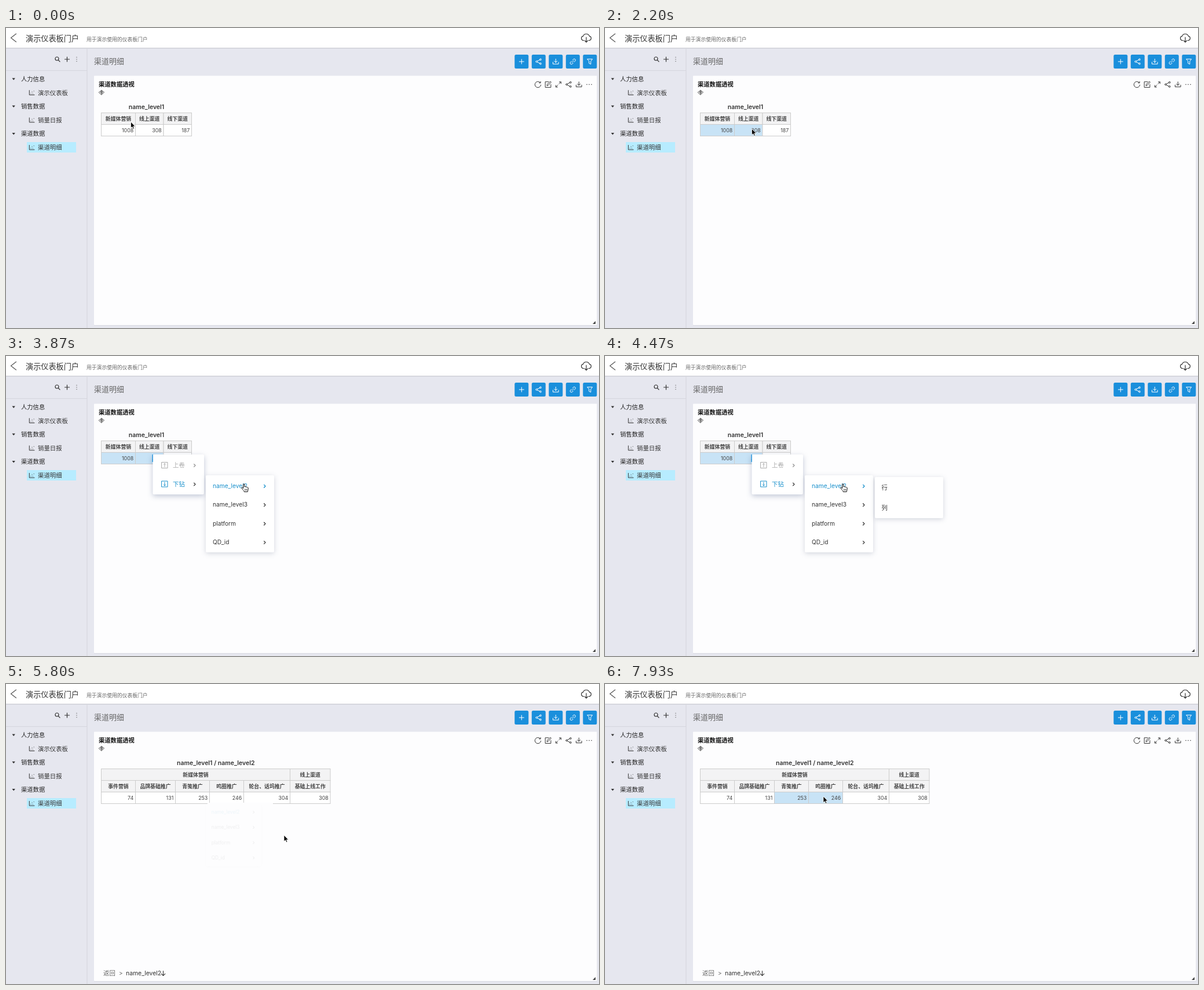
Recreate the animation shown at these times as an HTML page. Size 1024x518 px, loop 8000 ms.

```html
<!DOCTYPE html>
<html lang="zh-CN">
<head>
<meta charset="utf-8">
<title>演示仪表板门户</title>
<style>
  html, body { margin: 0; width: 100%; height: 100%; overflow: hidden; background: #e6e7ef; }
  svg { display: block; width: 100vw; height: 100vh; }
  text { font-family: Inter, "Noto Sans CJK SC", "Noto Sans CJK", sans-serif; }
  .icon { fill: none; stroke-linecap: round; stroke-linejoin: round; }
  .panel { filter: drop-shadow(0 2px 4px rgba(40, 55, 90, .2)); }
  #context { filter: drop-shadow(0 3px 5px rgba(40, 60, 110, .28)); }
</style>
</head>
<body>
<svg id="stage" viewBox="0 0 1024 518" xmlns="http://www.w3.org/2000/svg"></svg>
<script>
const BLUE = '#1a8fdc', LINK = '#178fcb', DARK = '#333', GREY = '#666', LINE = '#ccc', SELECTED = '#c8e3f6';

// ---------- drawing helpers ----------
const rect = (x, y, w, h, fill, extra = '') =>
  `<rect x="${x}" y="${y}" width="${w}" height="${h}" fill="${fill}" ${extra}/>`;
const text = (x, centerY, size, label, fill = DARK, extra = '') =>
  `<text x="${x}" y="${centerY + size * .37}" font-size="${size}" fill="${fill}" ${extra}>${label}</text>`;
const icon = (x, y, d, color = DARK, width = 1, extra = '') =>
  `<path class="icon" transform="translate(${x} ${y})" d="${d}" stroke="${color}" stroke-width="${width}" ${extra}/>`;
const group = (id, body, extra = '') => `<g id="${id}" ${extra}>${body}</g>`;
const MIDDLE = 'text-anchor="middle"', END = 'text-anchor="end"', BOLD = 'font-weight="600"';

const SHAPES = {
  plus: 'M-4 0H4M0-4V4',
  share: 'M-2.2-1L2-3M-2.2 1L2 3M-4.8 0a1.4 1.4 0 1 0 2.8 0a1.4 1.4 0 1 0-2.8 0M1.8-3.6a1.4 1.4 0 1 0 2.8 0a1.4 1.4 0 1 0-2.8 0M1.8 3.6a1.4 1.4 0 1 0 2.8 0a1.4 1.4 0 1 0-2.8 0',
  download: 'M0-4.5V1.5M-2.5-1L0 1.5 2.5-1M-4.8 1V4.2H4.8V1',
  link: 'M-1.5 1.5L1.5-1.5M-.5-2.5L1-4a2.1 2.1 0 0 1 3 3L2.5.5M.5 2.5L-1 4a2.1 2.1 0 0 1-3-3L-2.5-.5',
  filter: 'M-4.3-4.3H4.3L1.5-.5V4.5L-1.5 3V-.5Z',
  reload: 'M4.2-3A5.2 5.2 0 1 0 5.2 .8M4.6-5V-2.6H2.2',
  edit: 'M1-4.7H-5V5H4.7V0M-2 2L-1.5-.3 4-5.3 5.3-4 0 1.4Z',
  expand: 'M1-1L4.3-4.3M1.5-4.5H4.5V-1.5M-1 1L-4.3 4.3M-1.5 4.5H-4.5V1.5',
  chart: 'M-4.2-4V3.8H4.5M-1.5 1.2V1.3M.5-1.6V-1.5M1.7 1.2V1.3M3.7-2.8V-2.7',
  chevron: 'M-1.4-2.4L1 0-1.4 2.4',
};

const panel = (x, y, w, h) => rect(x, y, w, h, '#fff', 'rx="2"');

function menuIcon(y, color, up) {
  const arrow = up ? 'M0 3V-3M-1.5-1.5L0-3 1.5-1.5' : 'M0-3V3M-1.5 1.5L0 3 1.5 1.5';
  return icon(274, y, 'M-5-5H5V5H-5Z' + arrow, color);
}

// ---------- page chrome ----------
function chrome() {
  const sections = [['人力信息', '演示仪表板'], ['销售数据', '销量日报'], ['渠道数据', '渠道明细']];
  const buttons = ['plus', 'share', 'download', 'link', 'filter'];
  return rect(0, 0, 1024, 518, '#e6e7ef')
    + rect(0, 0, 1024, 34, '#fff') + rect(0, 34, 1024, 1.5, '#d0d1d8')
    + rect(139.5, 36, 1, 482, '#d3d4dc') + rect(0, 73, 140, 1, '#d5d6de')
    + icon(13, 17, 'M4.5-7L-4.5 0 4.5 7', '#555', 1.2)
    + text(34, 18, 13.15, '演示仪表板门户')
    + text(139, 20, 8.8, '用于演示使用的仪表板门户', GREY)
    + icon(1002, 17, 'M-4 4.5H-5a3.7 3.7 0 0 1-.5-7.3A5.8 5.8 0 0 1 5.5-2.8A3.7 3.7 0 0 1 5 4.5H4M0-1V7.5M-2.4 5L0 7.5 2.4 5', DARK, 1.2)
    + icon(89, 54, 'M-4-1a3 3 0 1 0 6 0a3 3 0 1 0-6 0M1.3 1.3L4 4', DARK, 1.2)
    + icon(105.5, 54, SHAPES.plus, DARK, 1.2)
    + icon(122, 54, 'M0-3.5V-3.4M0 0V.1M0 3.5V3.6', GREY, 1.4)
    + rect(36, 197, 85, 18, '#b7ecff')
    + sections.map(([title, page], i) => {
        const y = 88 + i * 47.3;
        return `<path d="M10.5 ${y - 1.5}h5.4l-2.7 3.4z" fill="${DARK}"/>`
          + text(26, y, 10.3, title, '#222') + icon(44.5, y + 23.7, SHAPES.chart) + text(55, y + 23.7, 10.4, page);
      }).join('')
    + text(152, 57.5, 13, '渠道明细', GREY)
    + buttons.map((name, i) => {
        const x = 890.3 + i * 29.5;
        return rect(x - 12, 46, 24, 24, BLUE, 'rx="2.5"') + icon(x, 58, SHAPES[name], '#fff');
      }).join('')
    + rect(152, 83, 869, 431, '#d9dae2', 'rx="1"') + rect(152, 82.5, 868.5, 430.5, '#fdfdfe', 'rx="1"')
    + text(160, 97.5, 10.3, '渠道数据透视', '#111', BOLD)
    + icon(165, 111, 'M-4.5 0L0-3.5 4.5 0 0 4ZM0-3.5V4M-1.6 0a1.6 1.6 0 1 0 3.2 0a1.6 1.6 0 1 0-3.2 0', '#444', .9)
    + '<path d="M1018 506V511H1013Z" fill="#444"/>';
}

function toolbar() {
  return ['reload', 'edit', 'expand', 'share', 'download']
    .map((name, i) => icon(918.5 + i * 17.7, 97.5, SHAPES[name])).join('')
    + icon(1007, 97.5, 'M-4 0h.1M0 0h.1M4 0h.1', DARK, 1.4);
}

// ---------- pivot tables ----------
// Each header row lists [label, first column, column after the last].
function pivot(id, title, edges, headerRows, values, selectable) {
  const left = edges[0], right = edges[edges.length - 1], top = 146.5;
  const cell = (x1, x2, y, fill, extra = '') =>
    rect(x1, y, x2 - x1, 20, fill, `stroke="${LINE}" ${extra}`);
  const bodyY = top + headerRows.length * 20;
  const headers = headerRows.map((row, r) => row.map(([label, from, to]) =>
    cell(edges[from], edges[to], top + r * 20, '#f3f3f4')
    + text((edges[from] + edges[to]) / 2, top + r * 20 + 10, 8.9, label, '#444', BOLD + MIDDLE)).join('')).join('');
  const body = values.map((value, i) => cell(edges[i], edges[i + 1], bodyY, '#fff')
    + (selectable.includes(i)
      ? rect(edges[i] + .5, bodyY + .5, edges[i + 1] - edges[i] - 1, 19, SELECTED, `id="${id}${i}"`) : '')
    + text(edges[i + 1] - 3.2, bodyY + 10, 8.9, value, '#444', END)).join('');
  return group(id, text((left + right) / 2, 136, 10.5, title, DARK, BOLD + MIDDLE) + headers + body);
}

const singles = labels => labels.map((label, i) => [label, i, i + 1]);
const summary = pivot('summary', 'name_level1', [164.5, 223.5, 272, 320.5],
  [singles(['新媒体营销', '线上渠道', '线下渠道'])], [1008, 308, 187], [0, 1]);
const detail = pivot('detail', 'name_level1 / name_level2', [164.5, 223.5, 292.5, 351.5, 410.5, 490.5, 560],
  [[['新媒体营销', 0, 5], ['线上渠道', 5, 6]],
   singles(['事件营销', '品牌基础推广', '青笺推广', '鸣圈推广', '轮台、话坞推广', '基础上线工作'])],
  [74, 131, 253, 246, 304, 308], [2, 3]);

const breadcrumb = group('breadcrumb',
  text(168, 499.5, 10.4, '返回', GREY) + text(195, 499.5, 10, '&gt;', GREY)
  + text(207, 499.5, 10.4, 'name_level2') + icon(271.5, 499.5, 'M0-4V4M-3.3 .8L0 4 3.3 .8', DARK, 1.1));

// ---------- menus ----------
const contextMenu = group('context', panel(253.5, 170, 88.5, 69)
  + rect(252.5, 170, 1.3, 13, BLUE)
  + menuIcon(188.5, '#aaa', true) + text(288, 188.5, 10.4, '上卷', '#aaa') + icon(326, 189, SHAPES.chevron, '#888', 1.2)
  + group('drill', menuIcon(221, LINK, false) + text(288, 221.5, 10.4, '下钻', LINK))
  + icon(326, 221.5, SHAPES.chevron, DARK, 1.3, 'id="drillArrow"'));

const levelMenu = group('levels', rect(345, 206, 118, 133, '#fff', 'rx="2"')
  + ['name_level2', 'name_level3', 'platform', 'QD_id'].map((label, i) =>
      text(357, 224.3 + i * 32.4, 10.2, label, DARK, `id="level${i}"`)
      + icon(447, 224.8 + i * 32.4, SHAPES.chevron, DARK, 1.3, `id="levelArrow${i}"`)).join(''), 'class="panel"');

const axisMenu = group('axes', panel(466, 209, 118, 71)
  + text(477.5, 227, 10.4, '行', DARK, 'id="axisRow"') + text(477.5, 262, 10.4, '列', DARK, 'id="axisColumn"'), 'class="panel"');

const pointer = group('pointer',
  `<path id="arrow" d="M0 0V10.8L2.5 8.6 4.1 12.3 5.9 11.5 4.3 7.9H7.6Z" fill="#000" stroke="#fff" stroke-width=".8"/>
   <g id="hand" stroke="#111" stroke-linejoin="round">
     <path d="M-1.2 1a1.1 1.1 0 0 1 2.2 0V5C1.5 4.3 3 4.4 3.2 5.3 4 4.6 5.2 5 5.3 5.9 6.2 5.4 7.2 6 7.2 7V9.5C7.2 11 6.2 11.8 6.2 13.5H.2C.2 12-1 11-2 9.8L-4 7.2C-4.5 6-3 5.4-2.2 6.4L-1.2 7.5Z" fill="#fff"/>
     <path d="M1.6 8.5V11.5M3.4 8.5V11.5M5.1 8.5V11.5" stroke-width=".7"/>
   </g>`);

document.getElementById('stage').innerHTML = chrome() + group('toolbar', toolbar()) + summary + detail
  + breadcrumb + rect(348, 205, 113, 3, '#fdfdfe', 'id="residue"') + contextMenu + levelMenu + axisMenu + pointer;

// ---------- timeline ----------
const LOOP = 8000, STEP = 200 / 3;
const RIGHT_CLICK = 2390, LEVELS_OPEN = 3087, AXES_OPEN = 4190, DRILLED = 5666;
const PATH = [
  [66, 215.5, 162], [267, 207, 176], [533, 207, 176], [800, 235.5, 174.5], [1333, 253.5, 174],
  [2533, 253.5, 174], [3000, 305, 217], [3267, 305, 217], [3867, 411, 221], [4533, 411, 221],
  [4933, 480, 232], [5333, 480, 261], [5867, 480, 261], [6667, 335, 195], [7133, 335, 195], [7600, 377, 194],
];

const $ = id => document.getElementById(id);
const clamp = v => Math.min(1, Math.max(0, v));
const progress = (t, start, duration) => clamp((t - start) / duration);
const show = (id, visible) => $(id).style.display = visible ? '' : 'none';
const paint = (id, attribute, color) => $(id).setAttribute(attribute, color);

function pointerAt(t) {
  const next = PATH.findIndex(key => key[0] > t);
  if (next === 0) return PATH[0].slice(1);
  if (next < 0) return PATH[PATH.length - 1].slice(1);
  const [t0, x0, y0] = PATH[next - 1], [t1, x1, y1] = PATH[next];
  const p = (t - t0) / (t1 - t0), e = p * p * (3 - 2 * p);
  return [x0 + (x1 - x0) * e, y0 + (y1 - y0) * e];
}

// Menus grow from 80 % while fading in, and shrink back on leaving.
function zoomMenu(id, x, y, t, open, close, leaveTime) {
  const enter = 1 - (1 - progress(t, open, 200)) ** 5;
  const p = progress(t, close, leaveTime);
  const leave = p < .5 ? 16 * p ** 5 : 1 - 16 * (1 - p) ** 5;
  const amount = enter * (1 - leave), scale = .8 + .2 * amount;
  show(id, amount > 0);
  $(id).setAttribute('opacity', amount);
  $(id).setAttribute('transform', `translate(${x} ${y}) scale(${scale}) translate(${-x} ${-y})`);
}

function select(id, t, start) {
  $(id).setAttribute('opacity', progress(t, start, 130));
}

function render(t) {
  const drilled = t >= DRILLED;
  const [x, y] = pointerAt(t);
  const inside = (left, top, right, bottom) => x >= left && x < right && y >= top && y < bottom;

  show('toolbar', t < RIGHT_CLICK || drilled);
  show('summary', !drilled);
  show('detail', drilled);
  show('breadcrumb', drilled);
  show('residue', drilled && t < 5860);

  select('summary0', t, 467);
  select('summary1', t, 1400);
  select('detail2', t, 6867);
  select('detail3', t, 7800);

  zoomMenu('context', 253.5, 170, t, RIGHT_CLICK, DRILLED, 60);
  zoomMenu('levels', 345, 206, t, LEVELS_OPEN, DRILLED, 200);
  zoomMenu('axes', 466, 209, t, AXES_OPEN, DRILLED, 60);

  const onDrill = t > RIGHT_CLICK && inside(253, 205, 343, 239);
  const drillActive = onDrill || t >= LEVELS_OPEN;
  $('drill').style.filter = drillActive ? '' : 'grayscale(1) brightness(.5)';
  paint('drillArrow', 'stroke', onDrill ? LINK : DARK);

  const onLevel = t > LEVELS_OPEN && inside(345, 206, 464, 240);
  paint('level0', 'fill', onLevel || t >= AXES_OPEN ? LINK : DARK);
  paint('levelArrow0', 'stroke', onLevel ? LINK : DARK);
  paint('axisRow', 'fill', inside(466, 209, 584, 244) ? LINK : DARK);
  paint('axisColumn', 'fill', inside(466, 244, 584, 280) ? LINK : DARK);

  const onMenu = !drilled && (onDrill || onLevel || (t > AXES_OPEN && inside(466, 209, 584, 280)));
  show('hand', onMenu);
  show('arrow', !onMenu);
  $('pointer').setAttribute('transform', `translate(${x} ${y})`);
}

const startTime = performance.now();
function tick() {
  const t = (performance.now() - startTime) % LOOP;
  render(Math.floor((t + 4) / STEP) * STEP);
  requestAnimationFrame(tick);
}
tick();
</script>
</body>
</html>
```
